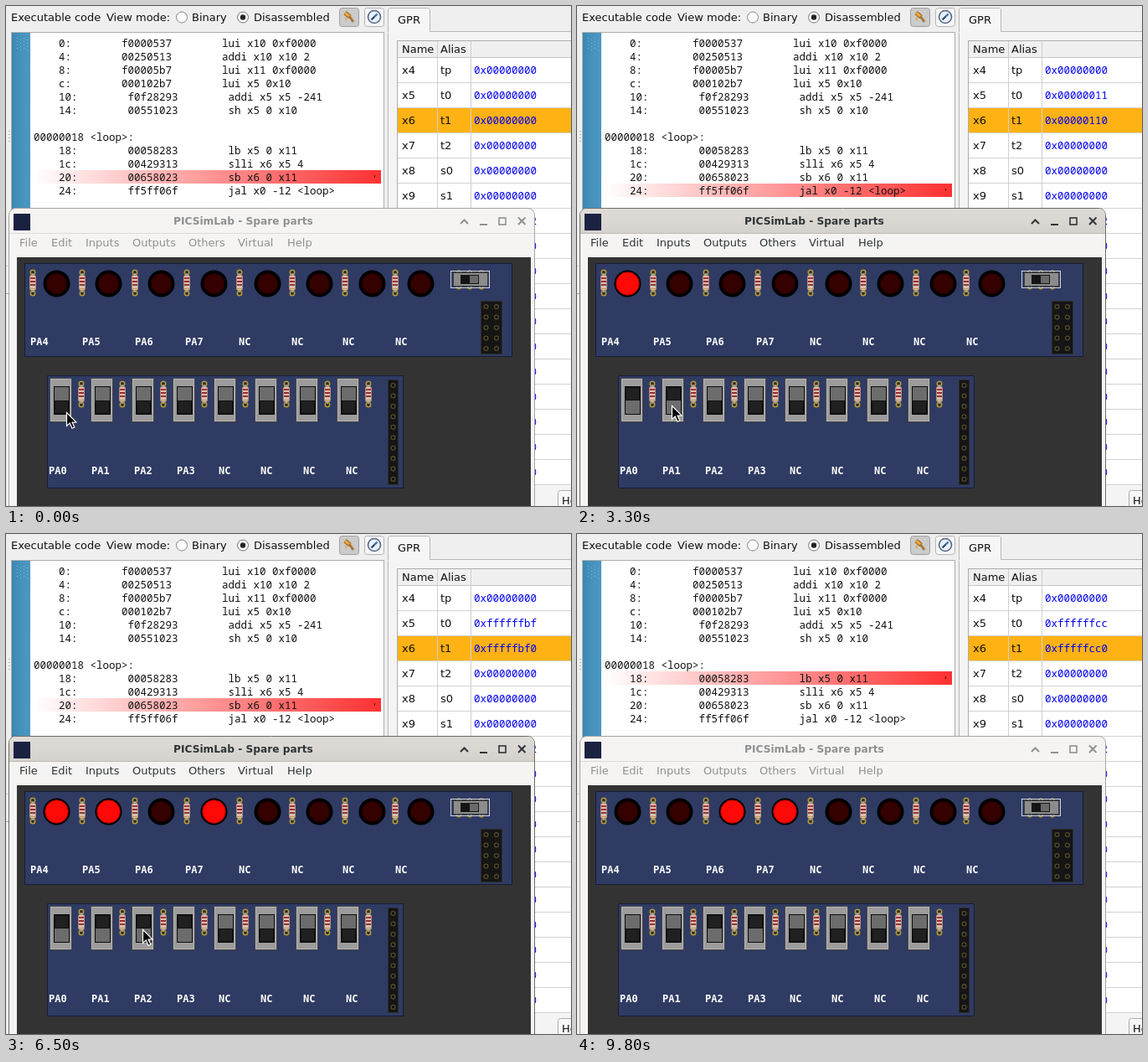
Animation, 675 px wide and 597 px high, one loop 9.9 s. Source, as an HTML page with a canvas:

```html
<!DOCTYPE html>
<html lang="en">
<head>
<meta charset="utf-8">
<title>Simulator with spare parts</title>
<style>
html, body { margin: 0; width: 100%; height: 100%; overflow: hidden; background: #efefef; }
canvas { display: block; }
</style>
</head>
<body>
<canvas id="stage" width="675" height="597"></canvas>
<script>
const ctx = document.getElementById('stage').getContext('2d');
const SANS = '13px "DejaVu Sans", sans-serif';
const TITLE = 'bold 12.2px "DejaVu Sans", sans-serif';
const MONO = '12.5px "Noto Sans Mono", "DejaVu Sans Mono", monospace';
const LABEL = 'bold 12px "DejaVu Sans Mono", monospace';
const STEP = 100, COUNT = 99;

const CODE = [
  ['0', 'f0000537', 'lui x10 0xf0000'],
  ['4', '00250513', 'addi x10 x10 2'],
  ['8', 'f00005b7', 'lui x11 0xf0000'],
  ['c', '000102b7', 'lui x5 0x10'],
  ['10', 'f0f28293', 'addi x5 x5 -241'],
  ['14', '00551023', 'sh x5 0 x10'],
  null,
  '00000018 <loop>:',
  ['18', '00058283', 'lb x5 0 x11'],
  ['1c', '00429313', 'slli x6 x5 4'],
  ['20', '00658023', 'sb x6 0 x11'],
  ['24', 'ff5ff06f', 'jal x0 -12 <loop>']
];
const ALIAS = ['tp', 't0', 't1', 't2', 's0', 's1'];

// [step, switch] toggles
const TOGGLES = [[16, 0], [33, 1], [51, 3], [62, 2], [74, 1], [86, 0]];
// [step, x, y] pointer path
const PATH = [[0, 72, 485], [16, 72, 485], [19, 95, 477], [22, 113, 477], [35, 113, 477],
  [43, 208, 484], [52, 208, 484], [55, 197, 478], [59, 163, 476], [65, 163, 472],
  [72, 116, 471], [77, 116, 471], [84, 61, 472], [90, 61, 472], [94, 690, 300]];

const hex = v => '0x' + (v >>> 0).toString(16).padStart(8, '0');

// Instructions executed on reaching a step: paused twice, one quick double step
function ticks(n) {
  if ((n > 24 && n < 33) || n === 35) return 0;
  return n === 96 ? 2 : 1;
}

function simulate(last) {
  const s = { pc: 2, x5: 0, x6: 0, changed: 6, leds: 0, sw: 0 };
  for (let n = 1; n <= last; n++) {
    for (const [at, i] of TOGGLES) if (at === n) s.sw ^= 1 << i;
    for (let k = ticks(n); k > 0; k--) {
      if (s.pc === 0) {
        const v = ((s.sw | s.leds << 4) << 24) >> 24;
        if (v !== s.x5) { s.x5 = v; s.changed = 5; }
      } else if (s.pc === 1) {
        const v = s.x5 << 4;
        if (v !== s.x6) { s.x6 = v; s.changed = 6; }
      } else if (s.pc === 2) {
        s.leds = s.x6 >> 4 & 15;
      }
      s.pc = (s.pc + 1) % 4;
    }
  }
  return s;
}

function pointerAt(n) {
  for (let i = 1; i < PATH.length; i++) {
    const [b, bx, by] = PATH[i];
    if (n <= b) {
      const [a, ax, ay] = PATH[i - 1];
      const u = (n - a) / (b - a);
      return [Math.round(ax + (bx - ax) * u), Math.round(ay + (by - ay) * u)];
    }
  }
  return null;
}

function rect(x, y, w, h, fill) {
  ctx.fillStyle = fill;
  ctx.fillRect(x, y, w, h);
}

function frame(x, y, w, h, fill, edge) {
  rect(x, y, w, h, edge);
  rect(x + 1, y + 1, w - 2, h - 2, fill);
}

function round(x, y, w, h, r, fill, edge) {
  ctx.beginPath();
  ctx.roundRect(x + .5, y + .5, w - 1, h - 1, r);
  ctx.fillStyle = fill;
  ctx.fill();
  ctx.lineWidth = 1;
  ctx.strokeStyle = edge;
  ctx.stroke();
}

function disc(x, y, r, fill, edge, width = 1) {
  ctx.beginPath();
  ctx.arc(x, y, r, 0, Math.PI * 2);
  if (fill) { ctx.fillStyle = fill; ctx.fill(); }
  if (edge) { ctx.lineWidth = width; ctx.strokeStyle = edge; ctx.stroke(); }
}

function line(color, width, ...p) {
  ctx.beginPath();
  ctx.moveTo(p[0], p[1]);
  for (let i = 2; i < p.length; i += 2) ctx.lineTo(p[i], p[i + 1]);
  ctx.lineWidth = width;
  ctx.strokeStyle = color;
  ctx.stroke();
}

function text(str, x, y, font = SANS, color = '#111') {
  ctx.font = font;
  ctx.fillStyle = color;
  ctx.fillText(str, x, y);
}

function drawToolbar() {
  text('Executable code', 6, 18);
  text('View mode:', 120, 18);
  disc(210, 13.5, 6.5, '#fff', '#858585');
  text('Binary', 222, 18);
  disc(283, 13.5, 6.5, '#fff', '#757575');
  disc(283, 13.5, 3.2, '#222');
  text('Disassembled', 296, 18);
  round(398, 2, 24, 23, 3, '#cbcbcb', '#a0a0a0');
  line('#8a5a20', 5, 405, 8, 411, 13);
  line('#eda63a', 3.5, 405, 8, 411, 13);
  line('#a9752e', 3, 410, 12, 415, 19);
  line('#d8b060', 2, 406, 13, 406, 17);
  round(428, 2, 24, 23, 3, '#f6f6f6', '#b4b4b4');
  disc(440, 13, 7.5, '#e9f0f8', '#52678a', 1.6);
  line('#3d6fb0', 2.4, 436.5, 16.5, 443.5, 9.5);
  line('#333', 1.2, 437, 16, 440, 13);
}

function drawCode(s) {
  frame(6, 31, 446, 580, '#fff', '#adadad');
  rect(7, 32, 22, 570, '#3f90bd');
  const shade = ctx.createLinearGradient(7, 0, 29, 0);
  shade.addColorStop(0, 'rgba(20,70,110,.12)');
  shade.addColorStop(1, 'rgba(255,255,255,.06)');
  rect(7, 32, 22, 570, shade);
  for (let i = 0; i < 16; i++) rect(13 + i % 4 * 4, 38 + (i >> 2) * 4 + i % 2 * 2, 1, 1, '#79b9dc');
  for (let y = 149; y < 165; y += 4) rect(3, y, 2, 1, '#b5b5b5');
  rect(0, 310, 2, 1, '#c4c4c4');
  rect(0, 343, 3, 1, '#a8a8a8');

  const y = 164 + 16 * s.pc;
  const red = ctx.createLinearGradient(33, 0, 448, 0);
  red.addColorStop(0, '#fff');
  red.addColorStop(1, '#ff3030');
  rect(33, y, 415, 16, red);
  rect(440, y + 6, 1, 3, '#501010');

  CODE.forEach((row, i) => {
    if (!row) return;
    const gap = ' '.repeat(8);
    const str = Array.isArray(row) ? '    ' + row[0] + ':' + gap + row[1] + gap + row[2] : row;
    text(str, 33, 49 + 16 * i, MONO);
  });
}

function drawRegisters(s) {
  rect(456, 30, 219, 567, '#f4f4f4');
  rect(456, 30, 219, 1, '#b8b8b8');
  rect(456, 30, 1, 567, '#b8b8b8');
  ctx.beginPath();
  ctx.roundRect(456.5, 2.5, 50, 30, [3, 3, 0, 0]);
  ctx.fillStyle = '#f6f6f6';
  ctx.fill();
  line('#b8b8b8', 1, 456.5, 31, 456.5, 4, 458.5, 2.5, 504.5, 2.5, 506.5, 4, 506.5, 30.5);
  rect(457, 29, 49, 5, '#f5f5f5');
  text('GPR', 468, 21);

  frame(467, 41, 220, 531, '#fff', '#adadad');
  rect(468, 42, 210, 20, '#f0f0f0');
  rect(468, 61, 210, 1, '#c6c6c6');
  text('Name', 473, 56);
  text('Alias', 519, 56);
  for (let i = 0; i < 17; i++) {
    const y = 62 + 30 * i, reg = i + 4;
    if (reg === s.changed) rect(468, y, 207, 30, '#ffb214');
    rect(468, y + 29, 207, 1, '#d2d2d2');
    const value = reg === 5 ? s.x5 : reg === 6 ? s.x6 : reg === 10 ? 0xf0000002 : 0;
    text('x' + reg, 473, y + 19);
    if (ALIAS[i]) text(ALIAS[i], 519, y + 19);
    text(hex(value), 559, y + 19, MONO, '#0000f0');
  }
  rect(515, 42, 1, 529, '#cfcfcf');
  rect(555, 42, 1, 529, '#cfcfcf');
  round(659, 578, 40, 30, 3, '#f8f8f8', '#adadad');
  text('He', 664, 595);
}

function drawWindow(active) {
  const edge = active ? '#6c6a67' : '#a5a3a0';
  const ink = active ? '#2e3436' : '#8f9191';
  round(3, 241, 629, 380, [8, 8, 0, 0], '#f5f4f2', edge);
  if (active) {
    const bar = ctx.createLinearGradient(0, 242, 0, 271);
    bar.addColorStop(0, '#dfdcd8');
    bar.addColorStop(1, '#d5d2ce');
    ctx.beginPath();
    ctx.roundRect(4, 242, 627, 29, [7, 7, 0, 0]);
    ctx.fillStyle = bar;
    ctx.fill();
  }
  rect(4, 271, 627, 1, active ? '#bdb9b4' : '#dddad6');
  rect(9, 248, 20, 20, '#1b2140');
  text('PICSimLab - Spare parts', 200, 261, TITLE, ink);
  line(ink, 2, 543, 260, 547.5, 255.5, 552, 260);
  rect(566, 260, 9, 2, ink);
  ctx.lineWidth = 1.6;
  ctx.strokeRect(589, 253, 8, 8);
  line(ink, 2, 612, 252.5, 620.5, 261);
  line(ink, 2, 620.5, 252.5, 612, 261);
  const menu = { File: 16, Edit: 54, Inputs: 95, Outputs: 151, Others: 218, Virtual: 277, Help: 336 };
  for (const name in menu) text(name, menu[name], 287, SANS, ink);
  rect(13, 300, 614, 297, '#333');
}

function resistor(x, y) {
  disc(x, y + 3, 2.7, '#2a2c30', '#b39a3a', 1.6);
  disc(x, y + 28, 2.7, '#2a2c30', '#b39a3a', 1.6);
  rect(x - .5, y + 4, 1, 23, '#c9c9c9');
  round(x - 4, y + 6, 8, 19, 2, '#dcbfb2', '#a98f86');
  rect(x - 3, y + 9, 6, 2, '#b03030');
  rect(x - 3, y + 13, 6, 2, '#a02c2c');
  rect(x - 3, y + 17, 6, 2, '#8d3a30');
  rect(x - 3, y + 22, 6, 1, '#c09a40');
}

function pins(x, y, w, h, cols, rows, dy) {
  frame(x, y, w, h, '#151515', '#2c2c2c');
  for (let c = 0; c < cols; c++) {
    for (let r = 0; r < rows; r++) disc(x + 6.5 + 12.5 * c, y + 7 + dy * r, 2.4, '#0c0c0c', '#544e2a', 1.3);
  }
}

function labels(first, xs, y) {
  xs.forEach((x, i) => text(i < 4 ? 'PA' + (first + i) : 'NC', x, y, LABEL, '#fff'));
}

function drawLeds(s) {
  frame(22, 307, 583, 112, '#2f3b63', '#171d36');
  [32, 91, 154, 216, 279, 342, 405, 465].forEach(x => resistor(x, 315));
  [60, 122, 185, 248, 312, 374, 437, 495].forEach((x, i) => {
    const on = s.leds >> i & 1;
    disc(x + .5, 331.5, 16, '#000');
    disc(x + .5, 331.5, on ? 13.8 : 12.2, on ? '#ff0808' : '#340000', on ? '#a80000' : '#1c0000', 1);
  });
  labels(4, [29, 91, 154, 214, 278, 341, 402, 465], 405);

  [541, 554, 568].forEach(x => {
    disc(x, 318, 2, null, '#a08c34', 1.4);
    disc(x, 336, 2, null, '#a08c34', 1.4);
  });
  ctx.lineWidth = 1;
  ctx.strokeStyle = '#cfd3dc';
  ctx.strokeRect(531.5, 316.5, 46, 20);
  frame(534, 318, 42, 17, '#8c8c8c', '#3c3c3c');
  frame(543, 321, 22, 11, '#6a6a6a', '#161616');
  rect(544, 322, 10, 9, '#141414');
  pins(567, 352, 26, 64, 2, 5, 12.5);
}

function drawSwitches(s) {
  frame(49, 441, 426, 135, '#2f3b63', '#171d36');
  for (let i = 0; i < 8; i++) {
    const x = 52 + 49 * i, up = s.sw >> i & 1;
    frame(x, 444, 27, 53, '#9c9c9c', '#454545');
    ctx.lineWidth = 1;
    ctx.strokeStyle = '#b4b4b4';
    ctx.strokeRect(x + 1.5, 445.5, 24, 50);
    frame(x + 5, 454, 19, 34, '#6c6c6c', '#0c0c0c');
    frame(x + 6, up ? 455 : 471, 17, 16, '#202020', '#101010');
    resistor(90 + 49 * i, 448);
  }
  labels(0, [51, 102, 153, 204, 254, 304, 355, 406], 559);
  pins(456, 446, 13, 126, 1, 10, 12.45);
}

function drawPointer(p) {
  if (!p) return;
  ctx.save();
  ctx.translate(p[0] + .5, p[1] + .5);
  ctx.beginPath();
  [[0, 0], [0, 16], [3.7, 12.6], [6.5, 18.8], [9.3, 17.5], [6.6, 11.6], [11.4, 11.4]]
    .forEach(([x, y]) => ctx.lineTo(x, y));
  ctx.closePath();
  ctx.fillStyle = '#000';
  ctx.fill();
  ctx.lineWidth = 1.2;
  ctx.strokeStyle = '#fff';
  ctx.stroke();
  ctx.restore();
}

function draw(n) {
  const s = simulate(n);
  rect(0, 0, 675, 597, '#efefef');
  drawToolbar();
  drawCode(s);
  drawRegisters(s);
  drawWindow(n >= 6 && n < 97);
  drawLeds(s);
  drawSwitches(s);
  drawPointer(pointerAt(n));
}

const start = performance.now();
let shown = -1;
function tick() {
  const n = Math.floor((performance.now() - start) / STEP) % COUNT;
  if (n !== shown) draw(shown = n);
  requestAnimationFrame(tick);
}
tick();
</script>
</body>
</html>
```
